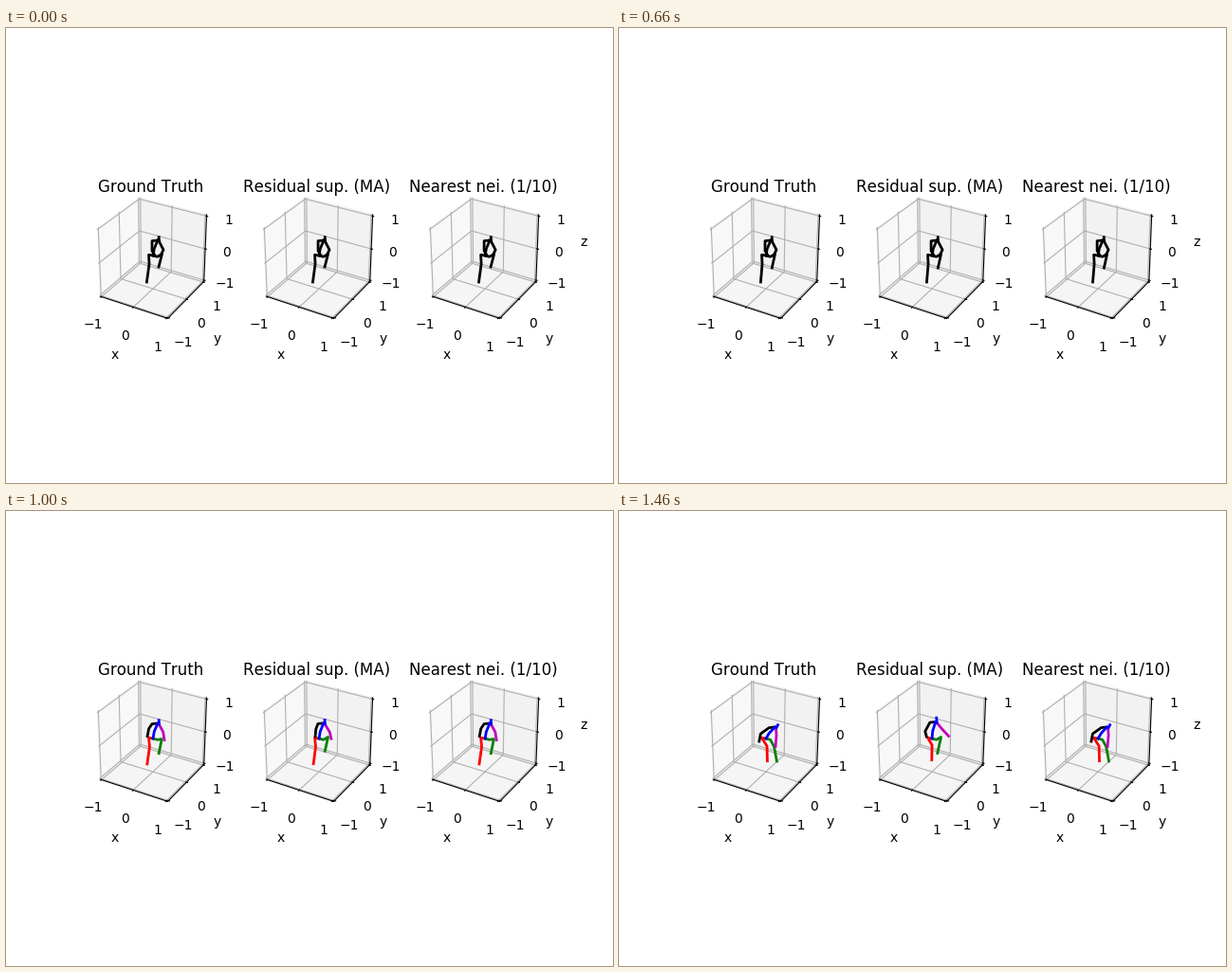
A matplotlib script for the animation above (1480 ms loop, 640 by 480 pixels).

```python
import numpy as np
import matplotlib.pyplot as plt
from matplotlib.animation import FuncAnimation

W, H, DPI = 640, 480, 100
FRAMES, INTERVAL = 74, 20
SWITCH = 49                      # observed motion ends, prediction begins

plt.rcParams["font.family"] = "DejaVu Sans"
plt.rcParams["text.kerning_factor"] = 6
fig = plt.figure(figsize=(W / DPI, H / DPI), dpi=DPI, facecolor="white")
ax = fig.add_axes([0, 0, 1, 1])
ax.set_xlim(0, W)
ax.set_ylim(H, 0)
ax.axis("off")

# Panel layout: three square cells in a row
SIDE = 496 / 3.4
LEFTS = [80 + k * 1.2 * SIDE for k in range(3)]
BOTTOM = 242.4 + SIDE / 2
TITLES = ["Ground Truth", "Residual sup. (MA)", "Nearest nei. (1/10)"]

# Camera: elevation 30, azimuth -60, distance 10
EL, AZ = np.radians(30), np.radians(-60)
EYE = np.array([np.cos(EL) * np.cos(AZ), np.cos(EL) * np.sin(AZ), np.sin(EL)])
RIGHT = np.array([-np.sin(AZ), np.cos(AZ), 0])
UP = np.cross(EYE, RIGHT)

B = 1 + 1 / 24                   # half size of the box
PAD = 48 / (72 * 2 * SIDE / DPI) / 6
TICK_PAD, LABEL_PAD = 11.5 * PAD, 25 * PAD


def project(points, left):
    d = np.atleast_2d(points) / 2
    w = 10 - d @ EYE
    scale = SIDE / 0.185
    x = left + scale * (0.095 + d @ RIGHT / w)
    y = BOTTOM - scale * (0.095 + d @ UP / w)
    return np.column_stack([x, y])


def line(points, left, color, order):
    x, y = project(points, left).T
    return ax.plot(x, y, color=color, lw=0.8, zorder=order)[0]


def label(point, left, text, va):
    x, y = project(point, left)[0]
    ax.text(x, y, text, size=10, ha="center", va=va, zorder=4)


panes, grid = [], []


def draw_box(left, title, show_z):
    walls = [
        ([(-B, -B, -B), (-B, B, -B), (-B, B, B), (-B, -B, B)], 0.95),
        ([(-B, B, -B), (B, B, -B), (B, B, B), (-B, B, B)], 0.90),
        ([(-B, -B, -B), (B, -B, -B), (B, B, -B), (-B, B, -B)], 0.925),
    ]
    for corners, tone in walls:
        x, y = project(corners, left).T
        shade = (tone, tone, tone, 0.5)
        panes.extend(ax.fill(x, y, fc=shade, ec=shade, lw=1, zorder=1))

    for v in (-1, 0, 1):
        paths = [
            [(v, -B, -B), (v, B, -B), (v, B, B)],
            [(B, v, -B), (-B, v, -B), (-B, v, B)],
            [(B, B, v), (-B, B, v), (-B, -B, v)],
        ]
        grid.extend(line(p, left, "#b0b0b0", 2) for p in paths)

        out, inner, far = B + 1 / 30, B - 1 / 60, B + TICK_PAD
        line([(v, -out, -B), (v, -inner, -B)], left, "k", 3)
        line([(out, v, -B), (inner, v, -B)], left, "k", 3)
        line([(out, B, v), (inner, B, v)], left, "k", 3)
        text = str(v).replace("-", "\u2212")
        for p in [(v, -far, -far), (far, v, -far), (far, far, v)]:
            label(p, left, text, "top")

    line([(-B, -B, -B), (B, -B, -B)], left, "k", 3)
    line([(B, -B, -B), (B, B, -B)], left, "k", 3)
    line([(B, B, -B), (B, B, B)], left, "k", 3)

    far = B + LABEL_PAD
    label((0, -far, -far), left, "x", "center")
    label((far, 0, -far), left, "y", "center")
    if show_z:
        label((far, far, 0), left, "z", "center")
    ax.text(left + SIDE / 2, BOTTOM - 0.92 * SIDE - 6 * DPI / 72, title,
            size=12, ha="center", va="baseline", zorder=4)


for k, (left, title) in enumerate(zip(LEFTS, TITLES)):
    draw_box(left, title, k == 2)

# Rig: every joint hangs from its parent by an offset in pixels
HIP = np.array([75, 240])
RIG = {
    "neck": ("hip", 5, -16), "head": ("neck", 1.2, -3.3),
    "r_elbow": ("neck", -6, 11), "r_hand": ("r_elbow", 3, 5),
    "l_elbow": ("neck", 6, 10), "l_hand": ("l_elbow", -3, 6),
    "r_knee": ("hip", -4, 9), "r_foot": ("r_knee", -2.6, 19),
    "l_knee": ("hip", 9.5, -1.5), "l_foot": ("l_knee", -3.5, 13.5),
}

# Moves: (first frame, last frame, shift of each joint from its parent)
OBSERVED = [
    (0, 19, {"l_foot": (-1.7, 2.5), "r_foot": (1, 0)}),
    (19, 33, {"l_foot": (2, -1.5)}),
    (33, 48, {"r_foot": (-1, -0.8), "l_hand": (4, 1),
              "r_elbow": (-1, -6), "r_hand": (-4.5, 3)}),
]
REACH_AND_BOW = [
    (47, 57, {"r_elbow": (-8, 2), "l_elbow": (-1, -3), "l_hand": (1, 5),
              "r_knee": (1.5, -1), "l_knee": (-1, 7), "l_foot": (0.6, 2)}),
    (57, 73, {"neck": (4.3, 4), "head": (2, 1), "l_elbow": (-3.3, 1.5),
              "l_hand": (-3, 0), "r_knee": (3.5, 0), "r_foot": (3, -2.5),
              "l_knee": (0, 3), "l_foot": (5.5, -1)}),
]
DRIFT = [
    (47, 57, {"r_elbow": (-4, 5), "r_hand": (3, -2.5), "l_elbow": (1.3, -2)}),
    (47, 73, {"neck": (-1.3, -1.5), "head": (-0.2, -1), "l_hand": (5.5, 0),
              "r_knee": (4, -2), "r_foot": (2.3, -2.5), "l_foot": (-0.6, 2.5)}),
]
TRUE_MOTION = OBSERVED + REACH_AND_BOW
MOTIONS = [TRUE_MOTION, OBSERVED + DRIFT, TRUE_MOTION]


def pose_at(moves, i):
    joints = {"hip": HIP}
    for name, (parent, dx, dy) in RIG.items():
        joints[name] = joints[parent] + (dx, dy)
        for start, end, shifts in moves:
            done = np.clip((i - start) / (end - start), 0, 1)
            # a shift reaches the joints below through their parent
            joints[name] = joints[name] + done * np.array(shifts.get(name, (0, 0)))
    return joints


def limbs(moves, i):
    j = pose_at(moves, i)
    hip, neck = j["hip"], j["neck"]
    chest = hip + 0.45 * (neck - hip) + (-1, 0)
    return [
        [hip, hip + (-4.5, -0.7), j["r_knee"], j["r_foot"]],
        [hip, hip + (4.6, 1.3), j["l_knee"], j["l_foot"]],
        [neck, neck + (-6, 0.6), j["r_elbow"], j["r_hand"]],
        [neck, neck + (1.2, 0.8), j["l_elbow"], j["l_hand"]],
        [hip, chest, neck, neck + (1.5, 1), j["head"]],
    ]


COLORS = ["#ff0000", "#008000", "#000000", "#bf00bf", "#0000ff"]
GREYS = ["#2c2c2c", "#383838", "#000000", "#6a6a6a", "#606060"]
bones = [[ax.plot([], [], lw=2, zorder=5)[0] for _ in COLORS] for _ in LEFTS]


def draw(i):
    grey = i == SWITCH
    fig.set_facecolor("#d3d3d3" if grey else "white")
    for pane in panes:
        pane.set_visible(not grey)
    for g in grid:
        g.set_color("#989898" if grey else "#b0b0b0")

    if i < SWITCH:
        palette = ["black"] * len(COLORS)
    else:
        palette = GREYS if grey else COLORS
    for left, moves, lines in zip(LEFTS, MOTIONS, bones):
        for bone, pts, color in zip(lines, limbs(moves, i), palette):
            x, y = np.transpose(pts)
            bone.set_data(x + left, y)
            bone.set_color(color)
    return [b for lines in bones for b in lines]


anim = FuncAnimation(fig, draw, frames=FRAMES, interval=INTERVAL,
                     repeat=True, repeat_delay=0, blit=False)
plt.show()
```
